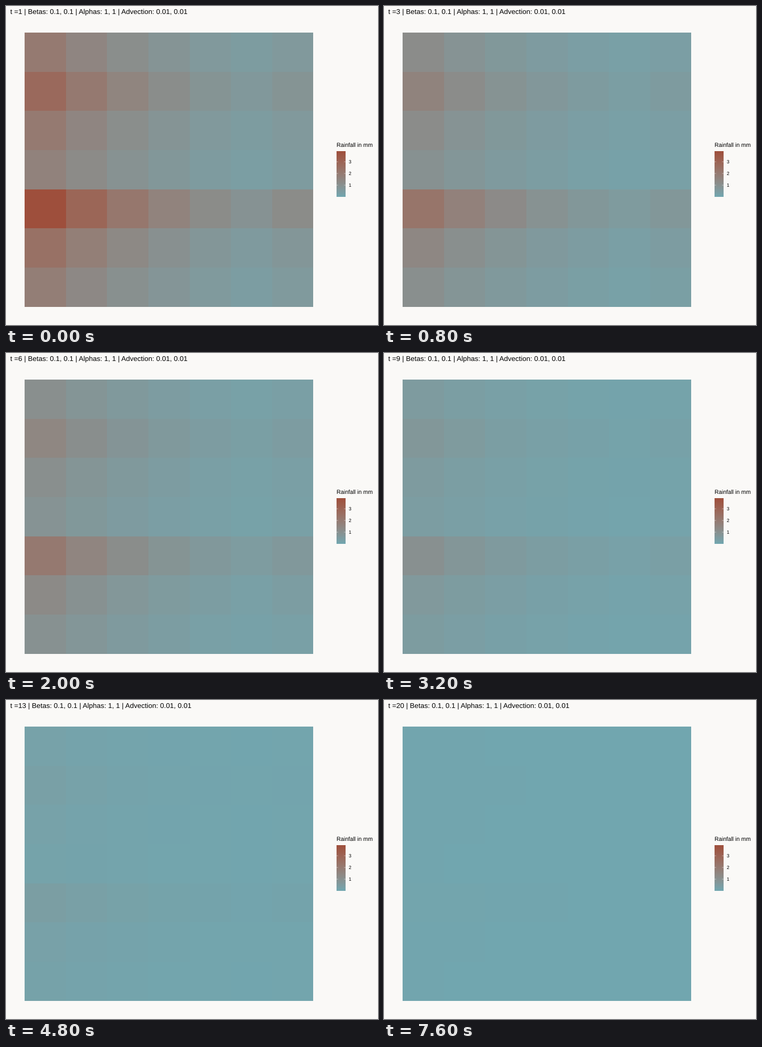
A matplotlib script that plays this animation: 700 px wide and 600 px high, repeating every 8000 ms.

```python
import numpy as np
import matplotlib.pyplot as plt
from matplotlib.animation import FuncAnimation
from matplotlib.colors import ListedColormap, to_rgb

WIDTH, HEIGHT, DPI = 700, 600, 100
CELLS = 7
PEAK = 3.89
LOW, HIGH, BACKGROUND = "#71a6af", "#9e4f3c", "#faf9f7"

RGB_TO_XYZ = np.array([[0.4124, 0.3576, 0.1805],
                       [0.2126, 0.7152, 0.0722],
                       [0.0193, 0.1192, 0.9505]])
WHITE = RGB_TO_XYZ.sum(axis=1)
XYZ_TO_LAB = np.array([[0, 116, 0], [500, -500, 0], [0, 200, -200]])


def to_lab(color):
    """CIE Lab without the constant offset of L, which cancels out."""
    rgb = np.array(to_rgb(color))
    linear = np.where(rgb <= 0.04045, rgb / 12.92, ((rgb + 0.055) / 1.055) ** 2.4)
    return XYZ_TO_LAB @ np.cbrt(RGB_TO_XYZ @ linear / WHITE)


def from_lab(lab):
    xyz = np.linalg.solve(XYZ_TO_LAB, lab) ** 3 * WHITE
    linear = np.clip(np.linalg.solve(RGB_TO_XYZ, xyz), 0, 1)
    rgb = np.where(linear <= 0.0031308, linear * 12.92,
                   1.055 * linear ** (1 / 2.4) - 0.055)
    return np.clip(rgb, 0, 1)


def lab_ramp(low, high, steps=300):
    start, end = to_lab(low), to_lab(high)
    return ListedColormap([from_lab(start + (end - start) * f)
                           for f in np.linspace(0, 1, steps)])


def row_profile(row):
    """A weak band around row 1, and a strong one that trails down from row 4."""
    weak = 0.71 * (1 + abs(row - 1)) ** -0.45
    strong = (1 + abs(row - 4)) ** -0.68
    return np.where(row < 4, weak, strong)


def col_profile(col):
    """Exponential decay to the right that turns back up after column 5."""
    return np.exp(-0.29 * np.minimum(col, 10 - col))


def level(step):
    """A first shower that dies fast, then a weaker one that lingers."""
    if step < 6:
        return np.exp(-0.19 * (step - 1) ** 1.5)
    return 0.53 * np.exp(-0.24 * (step - 6))


def rainfall(step):
    index = np.arange(CELLS)
    return PEAK * level(step) * np.outer(row_profile(index), col_profile(index))


def title_text(step):
    return f"t ={step} | Betas: 0.1, 0.1 | Alphas: 1, 1 | Advection: 0.01, 0.01"


def label(x, baseline, text, pixels):
    return ax.text(x, baseline, text, fontsize=pixels * 72 / DPI, color="black",
                   family="Liberation Sans", va="baseline")


plt.rcParams["text.hinting"] = "none"
fig = plt.figure(figsize=(WIDTH / DPI, HEIGHT / DPI), dpi=DPI, facecolor=BACKGROUND)
ax = fig.add_axes([0, 0, 1, 1])
ax.axis("off")
ramp = lab_ramp(LOW, HIGH)

tiles = ax.pcolormesh(np.linspace(35.3, 578.4, CELLS + 1),
                      np.linspace(49.8, 565.8, CELLS + 1),
                      rainfall(1), cmap=ramp, vmin=0, vmax=PEAK)
title = label(8, 15.5, title_text(1), 13.2)

# Legend
left, right, top, bottom = 622, 639.3, 273, 359.4
label(622, 266, "Rainfall in mm", 10.7)
ax.pcolormesh([left, right], np.linspace(top, bottom, 88),
              np.linspace(PEAK, 0, 87)[:, None], cmap=ramp, vmin=0, vmax=PEAK)
for value in (1, 2, 3):
    y = bottom - (bottom - top) * value / PEAK
    for x in (left, right - 3.46):
        ax.plot([x, x + 3.46], [y, y], color="white", lw=0.45 * 72 / DPI,
                solid_capstyle="butt")
    label(644.7, y + 3.2, str(value), 8.8)

ax.set_xlim(0, WIDTH)
ax.set_ylim(HEIGHT, 0)


def update(frame):
    step = frame + 1
    tiles.set_array(rainfall(step))
    title.set_text(title_text(step))
    return tiles, title


animation = FuncAnimation(fig, update, frames=20, interval=400,
                          repeat=True, repeat_delay=0)
plt.show()
```
